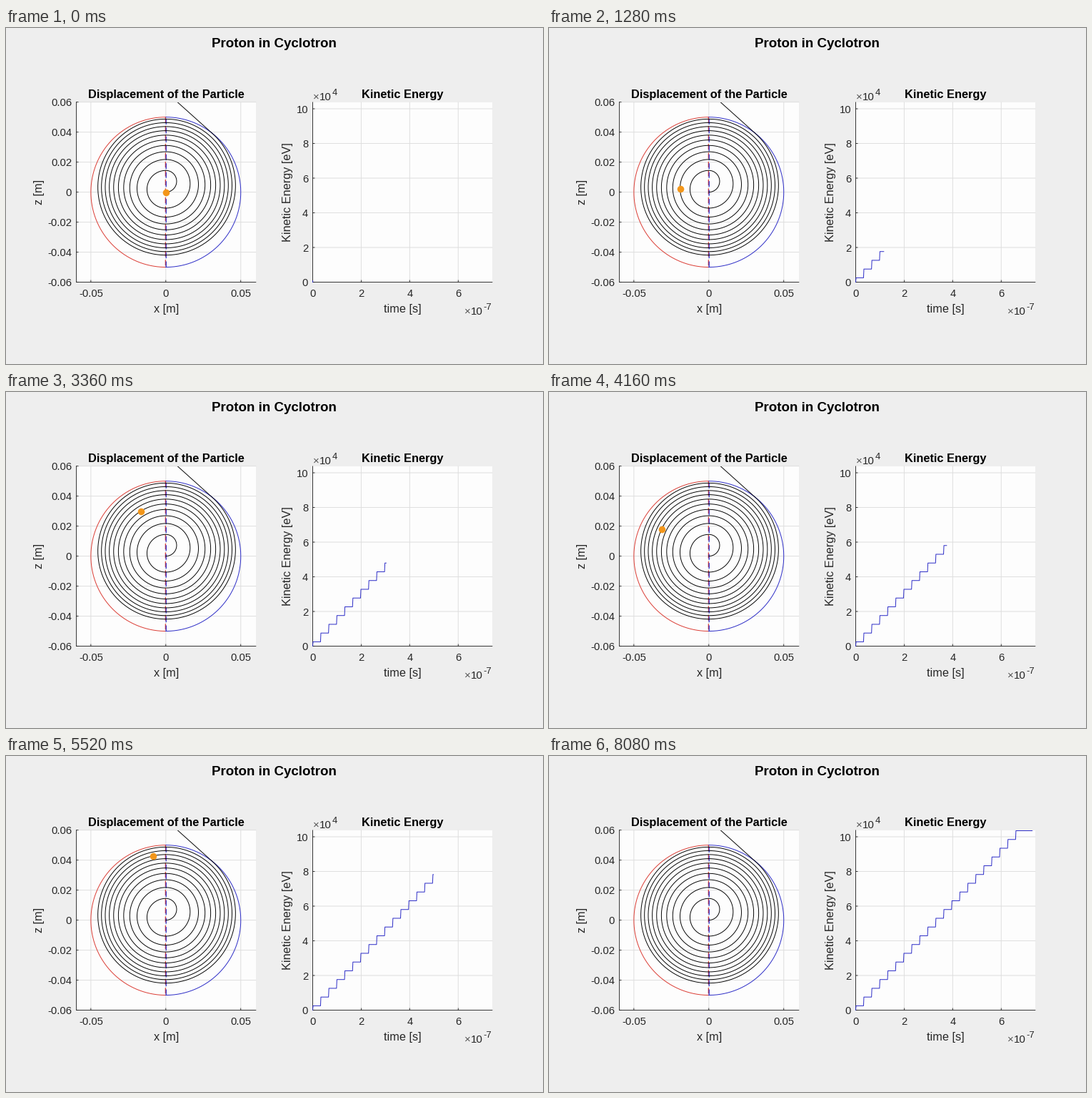
Recreate the animation shown at these times as a matplotlib script. Size 752 by 470 pixels, loop 8.16 s.

```python
import numpy as np
import matplotlib.pyplot as plt
from matplotlib.animation import FuncAnimation
from matplotlib.patches import Rectangle

W, H, DPI = 752, 470, 100
FRAMES, STEP_MS = 102, 80
PT = 72 / DPI
INK, GRID = "#262626", "#dfdfdf"
RED, BLUE = "#dc4038", "#3030c8"

# Physics: lengths in m, times in 1e-7 s, energies in 1e4 eV
HALF_TURN = 0.33
T0, DT = 0.0045, 0.072
R_DEE, R_EXIT = 0.05, 0.04994
LEVELS = 0.25 + 0.505 * np.arange(21)
RADII = 0.007225 * np.sqrt(LEVELS / LEVELS[0])
SIDES = np.where(np.arange(21) % 2 == 0, 1, -1)
STARTS = np.concatenate([[0], np.cumsum(2 * SIDES * RADII)[:-1]])
CENTRES = STARTS + SIDES * RADII
R_END, C_END = RADII[-1], CENTRES[-1]
EXIT = np.arccos((R_END**2 + C_END**2 - R_EXIT**2) / (2 * R_END * C_END))

# Layout in pixels, y pointing down
LEFT, RIGHT, TOP, BOTTOM = 98.5, 429.5, 104, 355.5
SIDE = 251.3
CX, CY, SCALE = 223.8, 229.6, 2099
TX, EY = 33.96, 24.25


def position(t):
    n = np.clip(np.floor(t / HALF_TURN), 0, 20).astype(int)
    a = np.pi * (t / HALF_TURN - n)
    free = np.where(n == 20, np.maximum(a - EXIT, 0), 0)
    a = a - free
    r = RADII[n]
    x = SIDES[n] * r * np.sin(a) + r * free * np.cos(a)
    z = CENTRES[n] - SIDES[n] * r * np.cos(a) + r * free * np.sin(a)
    return CX + SCALE * x, CY - SCALE * z


fig = plt.figure(figsize=(W / DPI, H / DPI), dpi=DPI, facecolor="#eeeeee")
ax = fig.add_axes([0, 0, 1, 1])
ax.set_xlim(0, W)
ax.set_ylim(H, 0)
ax.axis("off")


def line(x, y, color, width=1, **kw):
    return ax.plot(x, y, color=color, lw=width * PT, snap=False, **kw)[0]


def text(x, y, s, size, ha="center", color=INK, **kw):
    ax.text(x, y, s, fontsize=size * PT, family="Liberation Sans", ha=ha,
            va="baseline", color=color, rotation_mode="anchor", **kw)


def power(x, y, exponent):
    text(x, y, "×", 15, "left", "#555555")
    text(x + 9.3, y, "10", 15, "left")
    text(x + 26.5, y - 7, exponent, 13, "left")


def panel(x0, xticks, yticks, title, xlabel, ylabel, ylabel_x):
    x1 = x0 + SIDE
    box = Rectangle((x0, TOP), SIDE, BOTTOM - TOP, fc="#fdfdfd", ec="none")
    ax.add_patch(box)
    for x, _ in xticks:
        line([x, x], [TOP, BOTTOM], GRID)
    for y, _ in yticks:
        line([x0, x1], [y, y], GRID)
    line([x0, x0], [TOP, BOTTOM], INK, 0.9)
    line([x0, x1], [BOTTOM, BOTTOM], INK, 0.9)
    for x, s in xticks:
        line([x, x], [BOTTOM - 2.5, BOTTOM], INK, 0.9)
        text(x, 376, s, 14.8)
    for y, s in yticks:
        line([x0, x0 + 2.5], [y, y], INK, 0.9)
        text(x0 - 6.5, y + 5.6, s, 14.8, "right")
    mid = x0 + SIDE / 2
    text(mid, 98, title, 16.4, color="black", weight="bold")
    text(mid, 397.8, xlabel, 16.3)
    text(ylabel_x, CY, ylabel, 16.3, rotation=90)
    return box


dees = panel(
    LEFT,
    [(CX + SCALE * v, f"{v:g}") for v in (-0.05, 0, 0.05)],
    [(CY - SCALE * k / 50, f"{k / 50:g}") for k in range(-3, 4)],
    "Displacement of the Particle", "x [m]", "z [m]", 50.5)
panel(
    RIGHT,
    [(RIGHT + TX * v, str(v)) for v in (0, 2, 4, 6)],
    [(BOTTOM - EY * v, str(v)) for v in range(0, 11, 2)],
    "Kinetic Energy", "time [s]", "Kinetic Energy [eV]", 399)
power(430, 101, "4")
power(641.5, 401, "-7")
text(375.8, 27.2, "Proton in Cyclotron", 18.8, color="black", weight="bold")

# The two dees
arc = np.linspace(0, np.pi, 200)
R = R_DEE * SCALE
for sign, color in ((-1, RED), (1, BLUE)):
    line(CX + sign * R * np.sin(arc), CY - R * np.cos(arc), color)
    line([CX + sign * 0.45] * 2, [CY + sign * R, CY - sign * R], color, 1.3,
         dashes=(6.2, 3.4), dash_capstyle="butt")

path = line(*position(np.linspace(0, 7.3, 4000)), "black", 0.95)
path.set_clip_path(dees)

dot, = ax.plot([], [], "o", color="#f3961a", ms=9.6 * PT, mew=0, zorder=5,
               snap=False)
dot.set_clip_path(dees)
energy = line([], [], BLUE)

# Staircase corners
jumps = HALF_TURN * np.arange(1, 21)
knots_t = np.concatenate([[0, 0.014],
                          np.column_stack([jumps - 0.008, jumps + 0.008]).ravel(),
                          [8]])
knots_e = np.concatenate([[0], np.repeat(LEVELS, 2)])


def draw(i):
    t = T0 + DT * i
    x, y = position(np.array([t]))
    dot.set_data(x, y)
    seen = knots_t < t
    ts = np.append(knots_t[seen], t)
    es = np.append(knots_e[seen], np.interp(t, knots_t, knots_e))
    energy.set_data(RIGHT + TX * ts, BOTTOM - EY * es)
    return dot, energy


anim = FuncAnimation(fig, draw, frames=FRAMES, interval=STEP_MS,
                     repeat=True, repeat_delay=0, blit=False)
plt.show()
```
